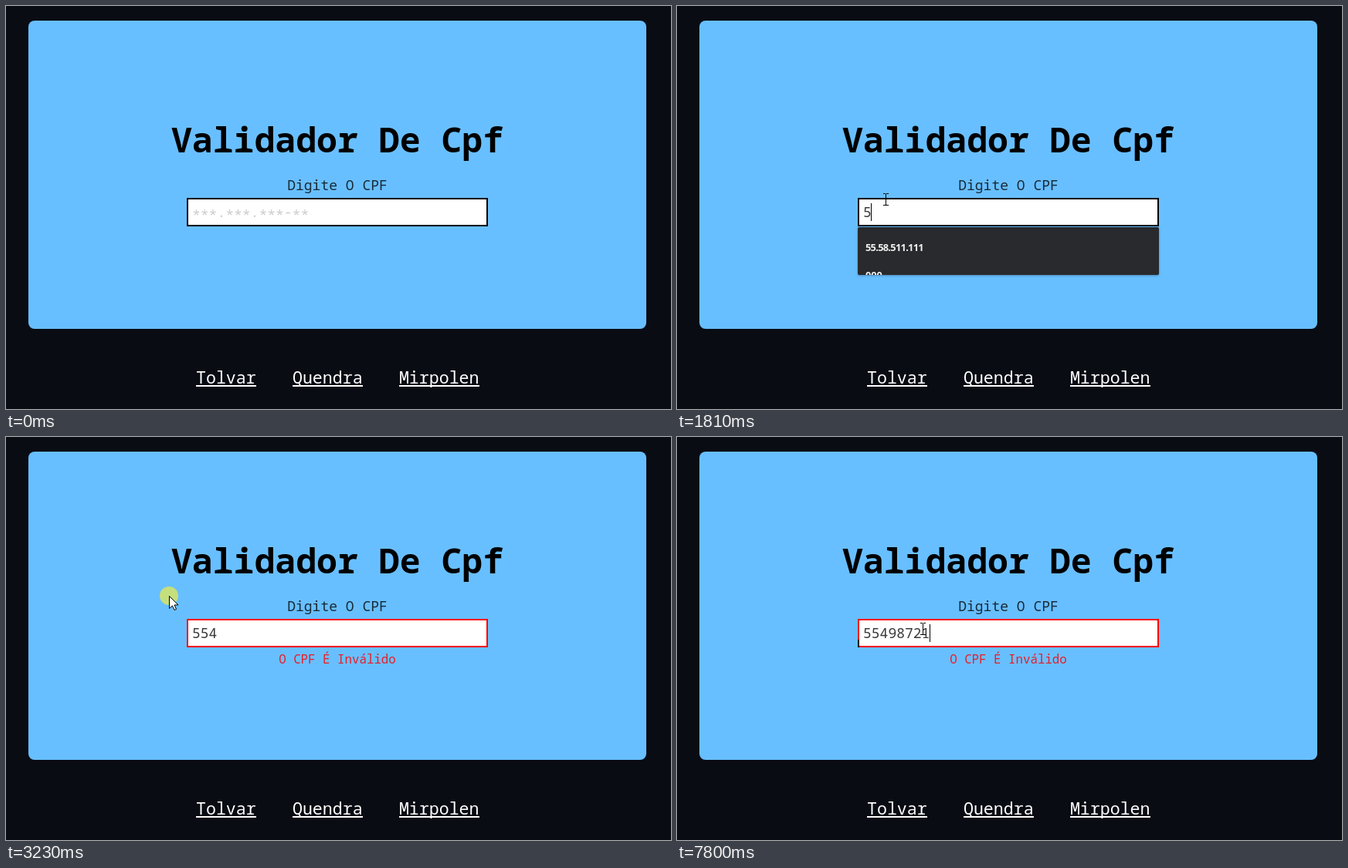
Animation, 861 px wide and 523 px high, one loop 8 s. Source, as an HTML page with a canvas:

```html
<!DOCTYPE html>
<html lang="pt-BR">
<head>
<meta charset="utf-8">
<title>Validador De Cpf</title>
<style>
html, body { margin: 0; width: 100%; height: 100%; overflow: hidden; background: #0a0c14; }
canvas { display: block; }
</style>
</head>
<body>
<canvas id="stage" width="861" height="523"></canvas>
<script>
const ctx = document.getElementById('stage').getContext('2d');
const LOOP = 8000;
const MONO = '"Noto Sans Mono", "DejaVu Sans Mono", monospace';
const SANS = '"Open Sans", "Noto Sans", sans-serif';
const BLUE = '#68bfff';
const CHAR = 10.8;
const BLINK = 540;
const TICK = 70;

const OPEN = 1000;
const SUBMIT = 3230;
const REFOCUS = 4520;
const BURSTS = [
  { chars: '554', start: 1810, gap: 235 },
  { chars: '987', start: 5860, gap: 205 },
  { chars: '21', start: 7600, gap: 200 }
];
const KEYS = BURSTS.flatMap(b => [...b.chars].map((char, i) => ({ char, time: b.start + i * b.gap })));
const [FIRST_KEY, , THIRD_KEY] = KEYS.map(key => key.time);

// Pointer trips along cubic curves: from, two controls, to.
const TRIPS = [
  { start: 190, end: 800, curve: [[649, 507], [540, 410], [380, 300], [268, 248]] },
  { start: 1270, end: 1270, curve: [[268, 248], [268, 248], [268, 250], [268, 250]] },
  { start: 2750, end: 2880, curve: [[268, 250], [250, 236], [228, 218], [211, 206]] },
  { start: 3700, end: 4320, curve: [[211, 206], [160, 240], [235, 285], [316, 248]] }
];
const ARROW = new Path2D('M0 0V16L4 12.5 6.5 18 9 17 6.5 11.5H11.5Z');

const smooth = u => u * u * (3 - 2 * u);

function bezier([a, b, c, d], u) {
  const v = 1 - u;
  return [0, 1].map(k => Math.round(
    a[k] * v ** 3 + 3 * b[k] * u * v * v + 3 * c[k] * u * u * v + d[k] * u ** 3));
}

function pointerAt(t) {
  const trip = TRIPS.filter(p => t >= p.start).pop();
  if (!trip) return null;
  const held = Math.floor((t - trip.start) / TICK + 1) * TICK;
  return bezier(trip.curve, smooth(Math.min(1, held / (trip.end - trip.start + TICK))));
}

function text(str, x, y, size, weight, color, align = 'left', family = MONO) {
  ctx.font = `${weight} ${size}px ${family}`;
  ctx.fillStyle = color;
  ctx.textAlign = align;
  ctx.fillText(str, x, y);
}

function rect(x, y, w, h, color) {
  ctx.fillStyle = color;
  ctx.fillRect(x, y, w, h);
}

function round(x, y, w, h, r, color) {
  ctx.fillStyle = color;
  ctx.beginPath();
  ctx.roundRect(x, y, w, h, r);
  ctx.fill();
}

function drawPage() {
  rect(0, 0, 861, 523, '#0a0c14');
  round(29, 19, 800, 400, 8, BLUE);
  let x = 246;
  for (const name of ['Tolvar', 'Quendra', 'Mirpolen']) {
    const width = name.length * 12.96;
    text(name, x, 490, 21.6, 500, '#fff');
    rect(Math.round(x), 492, Math.round(width), 2, '#fff');
    x += width + 47.2;
  }
}

function caretShown(t) {
  if (t < OPEN || (t >= SUBMIT && t < REFOCUS)) return false;
  const actions = [OPEN, REFOCUS, ...KEYS.map(key => key.time)];
  const last = Math.max(...actions.filter(time => time <= t));
  return (t - last) % (2 * BLINK) < BLINK;
}

function drawForm(t) {
  const invalid = t >= SUBMIT;
  const dy = invalid ? -13 : 0;
  const typed = KEYS.filter(key => t >= key.time).map(key => key.char).join('');
  text('Validador De Cpf', 429, 190 + dy, 44.8, 700, '#000', 'center');
  text('Digite O CPF', 429, 239 + dy, 18, 300, 'rgba(0,0,0,0.78)', 'center');
  rect(234, 249 + dy, 390, 37, invalid ? '#f00' : '#000');
  rect(236, 251 + dy, 386, 33, '#fff');
  if (t >= 4100) rect(234, 263, 2, 10, '#000');
  if (typed) text(typed, 241, 274 + dy, 18, 300, 'rgba(0,0,0,0.78)');
  else [...'***.***.***-**'].forEach((c, i) =>
    text(c, 241 + i * CHAR, c === '*' ? 278 : 274, 18, 300, '#ccc'));
  if (caretShown(t)) rect(Math.floor(241 + typed.length * CHAR), 256 + dy, 1, 23, '#000');
  if (invalid) text('O CPF É Inválido', 429, 294, 15.8, 300, 'rgba(255,0,0,0.85)', 'center');
}

function drawMenu(t) {
  if (t < OPEN) return;
  const fade = Math.floor(Math.max(0, t - THIRD_KEY) / TICK) * TICK / 190;
  if (fade >= 1) return;
  const filtered = t >= FIRST_KEY + TICK;
  const h = filtered ? 52 : t >= FIRST_KEY ? 62 : 196;
  const items = ['55.58.511.111', '000', '847', '996', '3232'].slice(0, filtered ? 1 : 5);
  const scale = 1 - fade * 0.047;
  ctx.save();
  ctx.translate(429, 287 + h / 2);
  ctx.scale(scale, scale);
  ctx.translate(-429, -287 - h / 2);
  ctx.shadowColor = 'rgba(0,0,0,0.3)';
  ctx.shadowBlur = 3;
  ctx.shadowOffsetY = 1;
  round(234, 287, 390, h, 2, '#292a2d');
  ctx.shadowColor = 'transparent';
  ctx.save();
  ctx.beginPath();
  ctx.rect(234, 287, 390, h);
  ctx.clip();
  items.forEach((item, i) => {
    ctx.letterSpacing = item.includes('.') ? '-0.7px' : '0px';
    text(item, 244, 318 + i * 36, 12.8, 700, '#f1f1f1', 'left', SANS);
  });
  ctx.restore();
  // Veil in the card colour fades panel and labels as one group.
  ctx.globalAlpha = fade;
  if (fade) rect(231, 287, 396, h + 4, BLUE);
  ctx.restore();
}

function drawBeam(x, y) {
  rect(x, y - 7, 1, 15, '#000');
  for (const end of [-8, 7]) {
    rect(x - 3, y + end, 3, 1, '#000');
    rect(x + 1, y + end, 3, 1, '#000');
  }
}

function drawArrow(x, y) {
  ctx.save();
  ctx.translate(x + 0.5, y + 0.5);
  ctx.fillStyle = '#fff';
  ctx.fill(ARROW);
  ctx.strokeStyle = '#000';
  ctx.stroke(ARROW);
  ctx.restore();
}

function drawPointer(t) {
  const pos = pointerAt(t);
  if (!pos) return;
  const [x, y] = pos;
  if ([OPEN, SUBMIT, REFOCUS].some(click => t >= click && t < click + TICK)) {
    round(x - 12, y - 12, 24, 24, 12, 'rgba(255,242,45,0.62)');
  }
  const top = t >= SUBMIT ? 235 : 248;
  const inside = x >= 234 && x < 624 && y >= top && y < top + 38;
  if (inside) drawBeam(x + 2, y + 1);
  else drawArrow(x, y);
}

const began = performance.now();

function frame() {
  const t = (performance.now() - began) % LOOP;
  drawPage();
  drawForm(t);
  drawMenu(t);
  drawPointer(t);
  requestAnimationFrame(frame);
}
frame();
</script>
</body>
</html>
```
